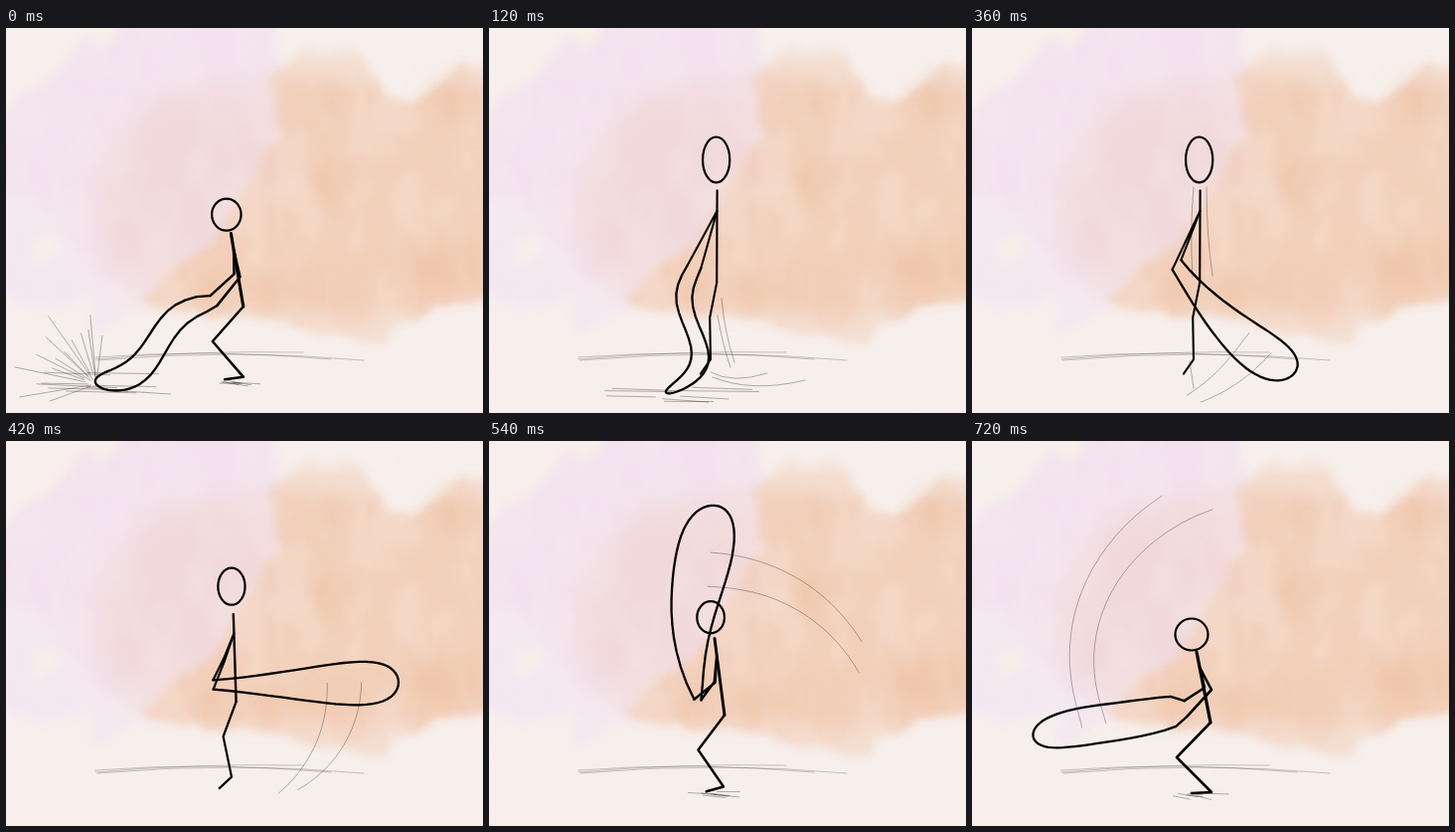
These frames come from a looping animation (480x387 px, 780 ms). An HTML page:

```html
<!DOCTYPE html>
<html lang="en">
<head>
<meta charset="utf-8">
<title>Swinging figure</title>
<style>
  html, body { margin: 0; width: 100%; height: 100%; overflow: hidden; background: #f7efec; }
  svg { display: block; width: 480px; height: 387px; }
</style>
</head>
<body>
<svg viewBox="0 0 480 387">
  <defs>
    <filter id="wash" x="-20%" y="-20%" width="140%" height="140%" color-interpolation-filters="sRGB">
      <feTurbulence type="fractalNoise" baseFrequency=".025" numOctaves="3" seed="4" result="noise"/>
      <feDisplacementMap in="SourceGraphic" in2="noise" scale="24" xChannelSelector="R" yChannelSelector="G"/>
      <feGaussianBlur stdDeviation="4"/>
    </filter>
    <filter id="soft" x="-60%" y="-60%" width="220%" height="220%"><feGaussianBlur stdDeviation="14"/></filter>
    <filter id="mottle" x="0" y="0" width="100%" height="100%" color-interpolation-filters="sRGB">
      <feTurbulence type="fractalNoise" baseFrequency=".022 .014" numOctaves="3" seed="9"/>
      <feColorMatrix values="0 0 0 0 .97  0 0 0 0 .94  0 0 0 0 .925  1.6 0 0 0 -.6"/>
    </filter>
    <linearGradient id="peach" gradientUnits="userSpaceOnUse" x1="0" y1="0" x2="0" y2="325">
      <stop offset="0" stop-color="#f1cfba" stop-opacity="0"/>
      <stop offset=".2" stop-color="#f1cfba" stop-opacity=".95"/>
      <stop offset=".84" stop-color="#f1cbb3" stop-opacity=".95"/>
      <stop offset="1" stop-color="#f1cfba" stop-opacity=".4"/>
    </linearGradient>
  </defs>

  <rect width="480" height="387" fill="#f7efec"/>
  <g filter="url(#wash)">
    <path fill="#f4e8f0" d="M-20 150L90 180 150 270 95 303 82 272 50 284-20 268Z"/>
    <path fill="#f3e2ee" d="M-20 100L22 68 62 32 95-15H265L282 80 235 180 185 262 125 272 85 240 45 195-20 160Z"/>
    <path fill="#f7eee9" d="M75-15h38L105 12 84 24ZM22 215l26-10 10 18-30 12Z"/>
  </g>
  <path filter="url(#soft)" fill="#f1d8d8" fill-opacity=".85" d="M90 155L135 80 200 55 280 70 245 200 180 265 130 265 92 220Z"/>
  <path filter="url(#wash)" fill="url(#peach)" d="M262 50L300 20 345 15 404 80 462 38 500 34V272L425 281 372 320 310 302 245 292 165 288 134 272 206 212 245 155 272 110Z"/>
  <g filter="url(#soft)" fill="#ecb894" fill-opacity=".5">
    <ellipse cx="252" cy="105" rx="20" ry="60" fill="#f1d8da"/>
    <ellipse cx="322" cy="120" rx="18" ry="60"/>
    <ellipse cx="440" cy="238" rx="38" ry="18"/>
    <ellipse cx="245" cy="262" rx="50" ry="12"/>
    <ellipse cx="458" cy="72" rx="28" ry="20"/>
  </g>
  <rect width="480" height="387" filter="url(#mottle)" opacity=".45"/>

  <g fill="none" stroke="#000" stroke-linecap="round" stroke-linejoin="round">
    <path stroke-width=".6" stroke-opacity=".35" d="M90 333Q190 324 299 326M90 331Q205 322 327 333M92 334Q230 322 360 334"/>
    <path id="marks" stroke-width=".6" stroke-opacity=".5"/>
    <path id="bag" stroke-width="2.3"/>
    <path id="body"/>
    <path id="torso"/>
    <ellipse id="head" stroke-width="2.2"/>
  </g>
</svg>
<script>
const STEP = 60, COUNT = 13, RAD = Math.PI / 180;
const $ = id => document.getElementById(id);
const lerp = (a, b, t) => Array.isArray(a) ? a.map((v, i) => lerp(v, b[i], t)) : a + (b - a) * t;
const line = (...pts) => 'M' + pts.map(p => p.map(v => v.toFixed(1))).join('L');
const polar = ([x, y], deg, r) => [x + r * Math.cos(deg * RAD), y + r * Math.sin(deg * RAD)];

// neck, hip, knee, heel, toe
const TALL = [[230, 158], [228, 253], [224, 288], [221, 331], [212, 347]];
const CROUCH = [[226, 212], [240, 283], [206, 318], [241, 353], [221, 354]];

// Every second pose; those between are halfway.
// grip: hands; bag: belly and mouth half-widths, sideways bend and sway, taper; trail: sweep, start and end radius
const key = (crouch, grip, angle, length, bag, trail) => [crouch, grip, angle, length, bag, trail];
const keys = [
  key(.9, [209, 274], 144.6, 145, [14, 6, -3, 10, .55], [0, 130, 130]),
  key(.1, [206.5, 240], 102, 130, [9, 7, -14, 14, .8], [0, 130, 130]),
  key(0, [212, 248], 59, 134, [22, -3.5, 12, -4, 2], [21, 130, 125]),
  key(.1, [206, 238], 43, 161, [33, 6.5, 9, 0, 1.2], [37, 140, 130]),
  key(.5, [211, 252], -44.6, 212, [31, 3, -7, 0, 1.2], [67, 131, 168]),
  key(1, [209, 268], -125.3, 180, [48, 4, -16, -5, .45], [64, 219, 129]),
  key(1, [215, 269], -190.4, 156, [19, 8, 0, -1, .35], [94, 215, 106])
];

// Short lines that belong to a single moment
const accents = {
  2: 'M234 272Q237 306 247 336M230 289Q235 318 243 341M223 346Q245 358 280 347M225 351Q265 367 318 354',
  6: 'M223 160Q219 205 222 250M236 160Q236 208 242 249M219 335L223 362',
  10: 'M218 272L211 305M223 274L215 302M228 325L239 336M266 334L244 348M270 342L246 348'
};

// Outline from one hand round the tip to the other: a wavy spine with a tapered, rounded width.
function bagOutline(grip, angle, length, [belly, mouth, bend, sway, taper]) {
  const n = 48;
  return Array.from({ length: n + 1 }, (_, i) => {
    const u = 1 - 2 * i / n, t = 1 - u * u;
    const spine = bend * 4 * t * (1 - t) + sway * Math.sin(2 * Math.PI * t);
    const half = (mouth * (1 - t) + belly * t ** taper) * Math.sqrt(1 - t ** (length / belly));
    return polar(polar(grip, angle, length * t), angle + 90, spine + Math.sign(u) * half);
  });
}

function arc(grip, angle, sweep, from, to) {
  const pts = [];
  for (let t = 0; t <= 1.001; t += 1 / 24)
    pts.push(polar(grip, angle + sweep * (1 - t), to + (from - to) * Math.max(0, 1 - t) ** 1.6));
  return line(...pts);
}

function randomizer(seed) {
  return () => (seed = seed * 16807 % 2147483647) / 2147483647;
}

function streaks(random, [x, y], width, height, count) {
  let d = '';
  for (let i = 0; i < count; i++) {
    const left = x + (random() - .7) * width, top = y + (random() - .5) * height;
    d += line([left, top], [left + width * (.4 + random() * .5), top + random() * 4]);
  }
  return d;
}

function burst(random, centre) {
  let d = '';
  for (let deg = 160; deg < 275; deg += 8) {
    const a = deg + random() * 8;
    d += line(polar(centre, a, 5 + random() * 12), polar(centre, a, 42 + random() * 42));
  }
  return d;
}

function marksFor(i, crouch, grip, angle, length, trail, toe) {
  const random = randomizer(i + 77), tip = polar(grip, angle, length);
  const [sweep, from, to] = trail;
  let d = accents[i] || '';
  if (i === 0) d += burst(random, tip);
  if (i < 3) d += streaks(random, tip, 90, 24, 8);
  if (crouch > .4) d += streaks(random, [toe[0] + 4, toe[1] + 2], 32, 4, 6);
  if (sweep) d += arc(grip, angle, sweep, from, to) + arc(grip, angle, sweep * 1.15, from * .94, to * .77);
  return d;
}

function draw(i) {
  const [crouch, grip, angle, length, bag, trail] = lerp(keys[i >> 1], keys[(i + 1) >> 1], .5);
  const [neck, hip, knee, heel, toe] = lerp(TALL, CROUCH, crouch);
  const shoulder = lerp(neck, hip, .22);
  const outline = bagOutline(grip, angle, length, bag);
  const arm = (hand, bent) => line(shoulder, lerp(lerp(shoulder, hand, .5), bent, crouch ** 3), hand);
  const set = (id, attrs) => Object.entries(attrs).forEach(([k, v]) => $(id).setAttribute(k, v));

  set('head', {
    cx: lerp(229.5, 221, crouch), cy: lerp(125.5, 194.5, crouch),
    rx: 13.6 + 2.9 * crouch ** 9, ry: 16 + 10.5 * (1 - crouch) ** 4
  });
  set('torso', { d: line(neck, shoulder, hip), 'stroke-width': 2 + 1.2 * crouch });
  set('body', {
    d: line(hip, knee, heel, toe) + arm(outline[0], [234, 248]) + arm(outline[outline.length - 1], [241, 250]),
    'stroke-width': 2 + .6 * crouch
  });
  set('bag', { d: line(...outline) });
  set('marks', { d: marksFor(i, crouch, grip, angle, length, trail, toe) });
}

let shown = -1;
function tick() {
  const i = Math.floor(performance.now() / STEP) % COUNT;
  if (i !== shown) draw(shown = i);
  requestAnimationFrame(tick);
}
tick();
</script>
</body>
</html>
```
